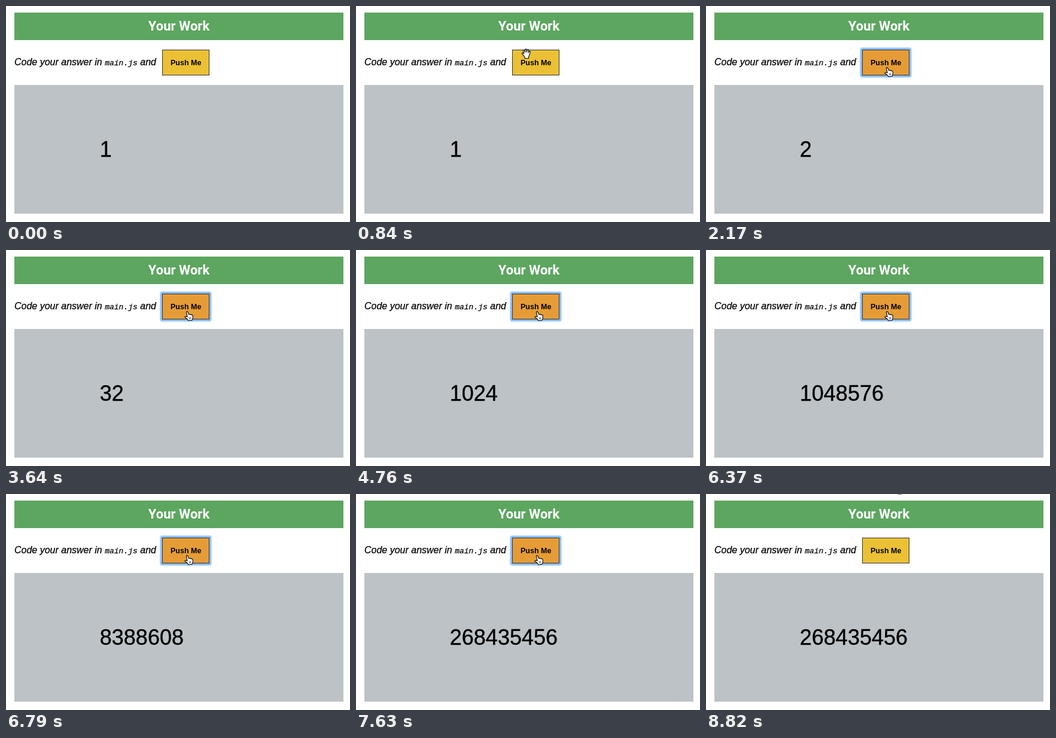
An HTML page that plays this animation: 575 px wide and 361 px high, repeating every 9030 ms.

```html
<!DOCTYPE html>
<html lang="en">
<head>
<meta charset="utf-8">
<title>Push Me</title>
<style>
  html, body { margin: 0; width: 100%; height: 100%; overflow: hidden; background: #fff; }
  svg { display: block; font-family: "Liberation Sans", Arial, sans-serif; }
  text { white-space: pre; }
  .title { font: bold 22px Roboto, sans-serif; fill: #fff; text-anchor: middle; }
  .task { font-style: italic; font-size: 16px; stroke: #000; stroke-width: .25; }
  .code { font-family: "Liberation Mono", monospace; font-size: 13px; }
  .label { font-weight: bold; font-size: 12.5px; }
  .count { font-size: 36px; stroke: #000; stroke-width: .4; }
  .ring { fill: none; stroke: #8cbffa; }
  .hand { fill: #fff; stroke: #000; stroke-width: 1.1; stroke-linejoin: round; }
</style>
</head>
<body>
<svg width="575" height="361" viewBox="0 0 575 361">
  <rect x="14" y="11" width="550" height="46" fill="#5ca660"/>
  <text class="title" x="289" y="41">Your Work</text>

  <text class="task" x="14" y="99">Code your answer in <tspan class="code">main.js</tspan> and</text>

  <g id="ring" class="ring">
    <rect x="258.5" y="70.5" width="84" height="48" rx="3" stroke-width="4" opacity=".35"/>
    <rect x="259.5" y="71.5" width="82" height="46" rx="2" stroke-width="3"/>
  </g>
  <rect id="button" x="261.5" y="73.5" width="78" height="42" stroke="#333"/>
  <text class="label" x="275" y="99">Push Me</text>

  <rect x="14" y="132" width="550" height="215" fill="#bdc2c6"/>
  <text id="count" class="count" x="156.8" y="252"></text>

  <g id="cursor" class="hand">
    <path id="open" d="M3.6 11.6L1 8.6Q.8 6.8 2.6 7.4L4.2 8.6 2.8 3.4Q3.4 1.4 5 2.8L6.2 6.4V1.6Q7.4.2 8.6 1.6L8.9 6.2 9.8 2Q11.2.9 12 2.4L11.7 7 13 4.6Q14.6 4 14.8 5.6L13.4 10.4Q12.8 13 12 14V16.5H5.6L5.4 14.4Z"/>
    <g id="point">
      <path d="M3.4 2.2Q4.6.4 6 2L7.6 6.2Q9 5.2 9.8 6.4 11.3 5.4 12 7 13.8 6.4 14.2 8.2 15 12 13 15.6L7 16.6Q5.5 13.5 1.2 11 .6 9.2 2.6 9.4L5.2 10.2Z"/>
      <path d="M8.2 11L9 14.2M10.2 10.6L10.8 13.8" fill="none" stroke-width=".8"/>
    </g>
  </g>
</svg>
<script>
const LOOP = 9030, TICK = 70, MAX_CLICKS = 28;

const $ = id => document.getElementById(id);
const [ring, button, count, cursor, open, point] =
  ["ring", "button", "count", "cursor", "open", "point"].map($);
const show = (el, on) => el.setAttribute("visibility", on ? "visible" : "hidden");
const clamp = (v, lo, hi) => Math.min(Math.max(v, lo), hi);
const within = (t, from, to) => t >= from && t < to;

// The cursor starts above the stage and makes a few straight moves.
const moves = [
  { from: 140, to: 840, dx: -7.5, dy: 95 },
  { from: 840, to: 1190, dx: 13.5, dy: 30.6 },
  { from: 1750, to: 2030, dx: 8, dy: 0 },
  { from: 7630, to: 7910, dx: 17, dy: -124 },
  { from: 8680, to: 8750, dx: 0, dy: 5.8 }
];

function cursorAt(t) {
  let x = 284, y = -24;
  for (const { from, to, dx, dy } of moves) {
    const k = clamp((t - from) / (to - from), 0, 1);
    x += dx * k;
    y += dy * k;
  }
  return [x, y];
}

// Slow clicking at first, then a faster steady rate takes over.
function clicksAt(t) {
  const slow = 1 + (t - 2105) / 375;
  const fast = 10 + (t - 4740) / 157;
  return clamp(Math.floor(Math.max(slow, fast)), 0, MAX_CLICKS);
}

function draw(now) {
  const t = Math.floor(now % LOOP / TICK) * TICK;
  const hover = within(t, 1960, 7770);
  cursor.setAttribute("transform", `translate(${cursorAt(t)})`);
  show(point, hover);
  show(open, !hover);
  show(ring, within(t, 2100, 8190));
  button.setAttribute("fill", hover ? "#e69c36" : "#ebc034");
  count.textContent = 2 ** clicksAt(t);
}

const start = performance.now();
function frame() {
  draw(performance.now() - start);
  requestAnimationFrame(frame);
}
frame();
</script>
</body>
</html>
```
